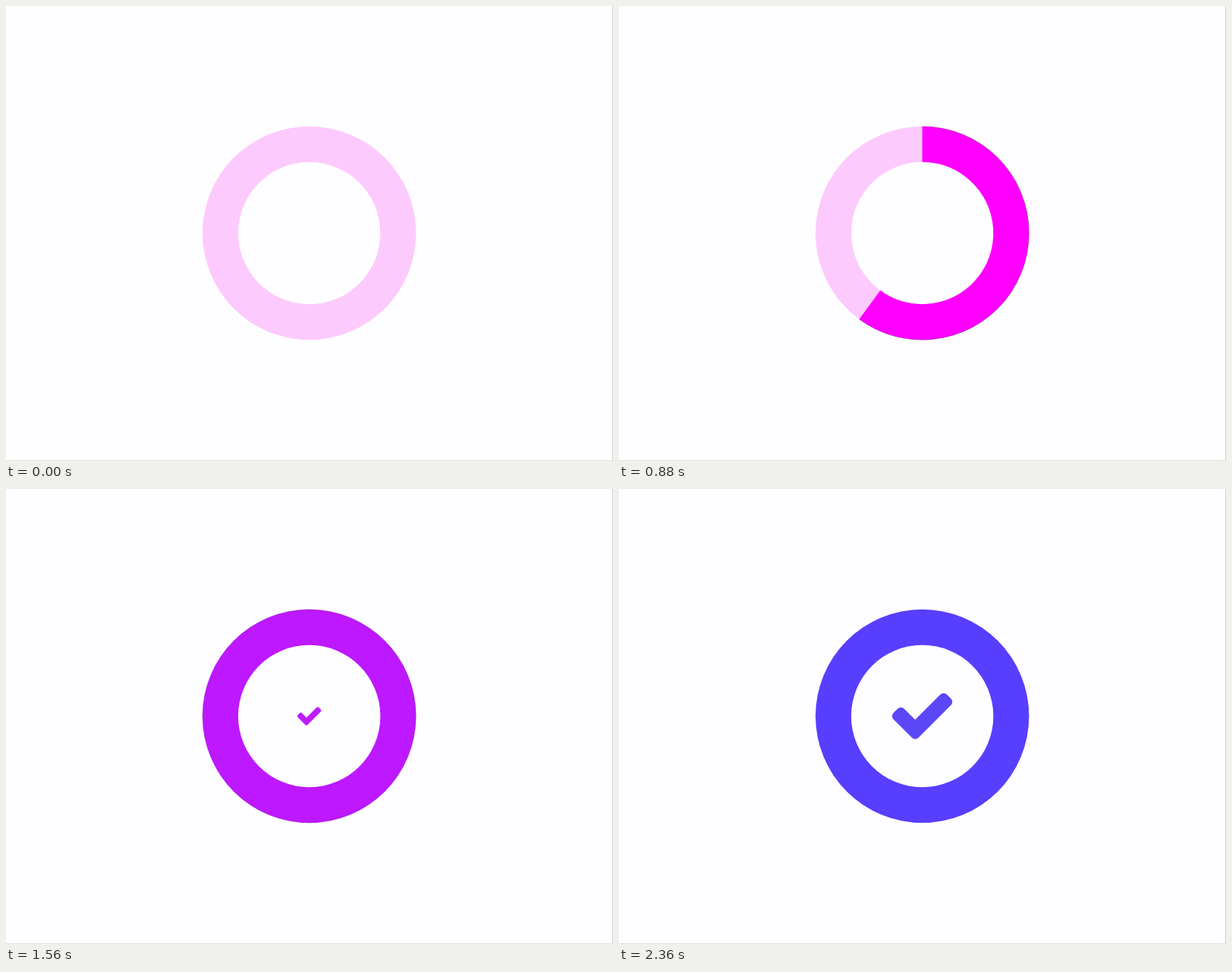
Animation, 800 px wide and 600 px high, one loop 2400 ms. Source, as an HTML page with a canvas:

```html
<!DOCTYPE html>
<html lang="en">
<head>
<meta charset="utf-8">
<title>Progress ring</title>
<style>
html, body { margin: 0; width: 100%; height: 100%; overflow: hidden; background: #fefdff; }
canvas { display: block; }
</style>
</head>
<body>
<canvas id="stage" width="800" height="600"></canvas>
<script>
const ctx = document.getElementById('stage').getContext('2d');
const LOOP = 2400, MOVE = 200;
const CX = 399.7, CY = 299.5, OUTER = 140.7, INNER = 93.7;
const TOP = -Math.PI / 2;
const MAGENTA = [255, 0, 255], RING = [88, 62, 255], TICK = [92, 71, 248];

// Each step sweeps on to the given angle in degrees.
const STEPS = [
  { at: 40, to: 110.7 },
  { at: 636, to: 216.2 },
  { at: 1236, to: 360 }
];
const DONE_AT = 1519;

// cubic-bezier(0, 0, .58, 1)
function easeOut(x) {
  if (x <= 0) return 0;
  if (x >= 1) return 1;
  let lo = 0, hi = 1;
  for (let i = 0; i < 24; i++) {
    const s = (lo + hi) / 2;
    if (1.74 * s * s * (1 - s) + s * s * s < x) lo = s; else hi = s;
  }
  return lo * lo * (3 - 2 * lo);
}

function sweepAt(t) {
  let angle = 0;
  for (const { at, to } of STEPS) angle += (to - angle) * easeOut((t - at) / MOVE);
  return angle;
}

function mix(a, b, k) {
  return `rgb(${a.map((v, i) => Math.round(v + (b[i] - v) * k)).join(',')})`;
}

function band(degrees, color) {
  const end = TOP + degrees * Math.PI / 180;
  ctx.beginPath();
  ctx.arc(CX, CY, OUTER, TOP, end);
  if (degrees >= 360) ctx.moveTo(CX, CY - INNER);
  ctx.arc(CX, CY, INNER, end, TOP, true);
  ctx.closePath();
  ctx.fillStyle = color;
  ctx.fill();
}

function rim(degrees, alpha) {
  ctx.beginPath();
  ctx.arc(CX, CY, OUTER, TOP, TOP + degrees * Math.PI / 180);
  ctx.strokeStyle = `rgba(70,0,80,${alpha})`;
  ctx.lineWidth = 0.6;
  ctx.stroke();
}

function tick(scale, color) {
  ctx.save();
  ctx.translate(CX, CY);
  ctx.scale(scale, scale);
  ctx.beginPath();
  ctx.moveTo(-9.4, 4.8);
  ctx.arcTo(28.1, -32.7, 42.1, -18.7, 6);
  ctx.arcTo(42.1, -18.7, -9.4, 32.8, 6);
  ctx.arcTo(-9.4, 32.8, -42.2, 0, 6);
  ctx.arcTo(-42.2, 0, -28.2, -14, 6);
  ctx.arcTo(-28.2, -14, -9.4, 4.8, 6);
  ctx.closePath();
  ctx.fillStyle = color;
  ctx.fill();
  ctx.restore();
}

function draw(t) {
  ctx.fillStyle = '#fefdff';
  ctx.fillRect(0, 0, 800, 600);
  ctx.fillStyle = '#dfe2df';
  ctx.fillRect(0, 599, 800, 1);
  ctx.fillStyle = '#cfcfd2';
  ctx.fillRect(799, 0, 1, 600);

  const sweep = sweepAt(t);
  const done = easeOut((t - DONE_AT) / MOVE * 1.25);
  if (sweep < 360) band(360, '#fdcafe');
  if (sweep > 0) {
    band(sweep, mix(MAGENTA, RING, done));
    rim(sweep, 0.5 * (1 - done));
  }
  if (done > 0) tick(done, mix(MAGENTA, TICK, done));
}

const start = performance.now();
function tickFrame() {
  draw((performance.now() - start) % LOOP);
  requestAnimationFrame(tickFrame);
}
tickFrame();
</script>
</body>
</html>
```
